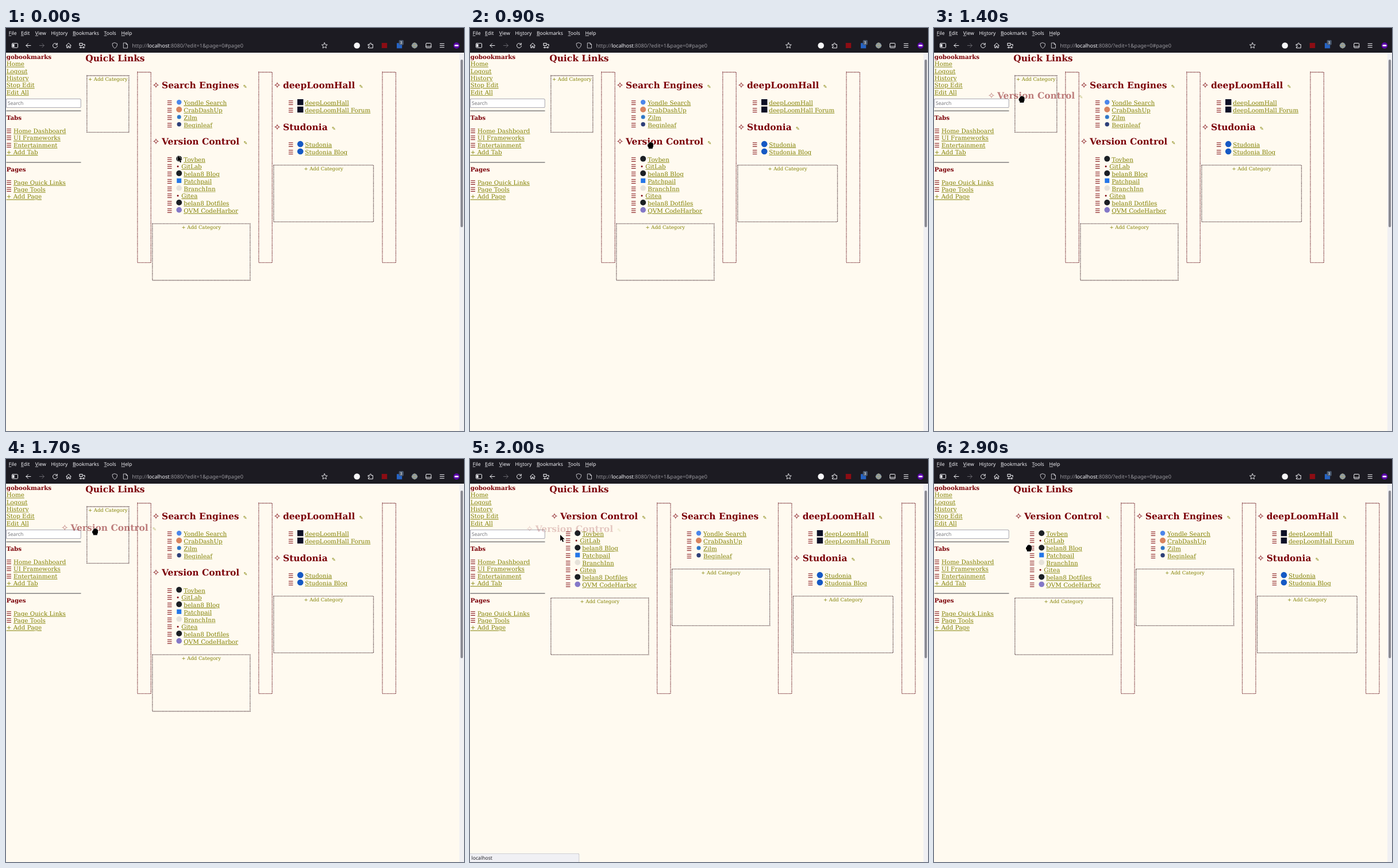
Recreate the animation shown at these times as an HTML page with a canvas. Size 797 by 702 pixels, loop 3 s.

```html
<!DOCTYPE html>
<html lang="en">
<head>
<meta charset="utf-8">
<title>Quick Links</title>
<style>
  html, body { margin: 0; width: 100%; height: 100%; overflow: hidden; background: #fffaf0; }
  canvas { display: block; }
</style>
</head>
<body>
<canvas id="stage" width="797" height="702"></canvas>
<script>
const ctx = document.getElementById('stage').getContext('2d');
ctx.textRendering = 'geometricPrecision';

const LOOP = 3000, STEP = 100;
const PAPER = '#fffaf0', MAROON = '#7b0008', OLIVE = '#808000', BAR = '#1c1b22', LIGHT = '#f4f4f8';
const BODY = '10.35px "DejaVu Serif", serif';
const BOLD = 'bold ' + BODY;
const HEAD = 'bold 15.45px "DejaVu Serif", serif';
const SMALL = '8.45px "DejaVu Serif", serif';
const SYMBOL = '10.35px "DejaVu Sans", sans-serif';
const UI = '8.65px "Noto Sans", sans-serif';
const URL_FONT = '9.1px "Noto Sans", sans-serif';

// Links: [label, icon shape, icon colour, radius]; no shape means a plain bullet.
const SEARCH = { title: 'Search Engines', links: [
  ['Yondle Search', 'dot', '#4b86ea', 4.2], ['CrabDashUp', 'dot', '#d8845f', 5],
  ['Zilm', 'dot', '#2f78c8', 3.5], ['Beginleaf', 'dot', '#2d3f78', 3.7]] };
const VERSION = { title: 'Version Control', links: [
  ['Tovben', 'dot', '#1b1f24', 5], ['GitLab'], ['belan8 Blog', 'dot', '#1b1f24', 5],
  ['Patchpail', 'box', '#2476e8', 4], ['BranchInn', 'dot', '#e6e2da', 4.8], ['Gitea'],
  ['belan8 Dotfiles', 'dot', '#1b1f24', 5], ['QVM CodeHarbor', 'dot', '#8478c8', 4.8]] };
const CAMP = { title: 'deepLoomHall', links: [
  ['deepLoomHall', 'box', '#0d1026', 5.2], ['deepLoomHall Forum', 'box', '#0d1026', 5.2]] };
const COURSES = { title: 'Studonia', links: [
  ['Studonia', 'dot', '#1559c4', 5.3], ['Studonia Blog', 'dot', '#1559c4', 5.3]] };

const BEFORE = { strips: [228.8, 439.8, 655], columns: [
  { x: 140.8, width: 73, groups: [] },
  { x: 254.8, width: 170, groups: [SEARCH, VERSION] },
  { x: 465.8, width: 173.7, groups: [CAMP, COURSES] }] };
const AFTER = { strips: [325.6, 536.5, 751.5], columns: [
  { x: 140.8, width: 170, groups: [VERSION] },
  { x: 351.6, width: 170, groups: [SEARCH] },
  { x: 562.5, width: 173.7, groups: [CAMP, COURSES] }] };

// Pointer path: time, x, y
const PATH = [[0, 299, 222], [900, 314, 204.3], [1400, 152.5, 124], [1900, 156.3, 128],
  [2000, 157, 132], [2500, 162, 143.5], [2900, 165, 155], [3000, 165, 155]];
const GRAB = { x: 313.5, y: 204.5 };

function write(str, x, y, font, color) {
  ctx.font = font;
  ctx.fillStyle = color;
  ctx.fillText(str, x, y);
  return ctx.measureText(str).width;
}

function fill(color, x, y, w, h, r = 0) {
  ctx.fillStyle = color;
  ctx.beginPath();
  ctx.roundRect(x, y, w, h, r);
  ctx.fill();
}

function dot(color, x, y, r) {
  ctx.fillStyle = color;
  ctx.beginPath();
  ctx.arc(x, y, r, 0, Math.PI * 2);
  ctx.fill();
}

function outline(d, x, y, color = LIGHT, width = 1) {
  ctx.save();
  ctx.translate(x, y);
  ctx.strokeStyle = color;
  ctx.lineWidth = width;
  ctx.lineJoin = ctx.lineCap = 'round';
  ctx.stroke(new Path2D(d));
  ctx.restore();
}

// The underline breaks around descenders.
function link(str, x, y) {
  ctx.font = BODY;
  fill(OLIVE, x, y + 1.1, ctx.measureText(str).width, 0.9);
  ctx.strokeStyle = PAPER;
  ctx.lineWidth = 1.5;
  ctx.strokeText(str, x, y);
  write(str, x, y, BODY, OLIVE);
}

function dotted(x, y, w, h, color) {
  ctx.save();
  ctx.strokeStyle = color;
  ctx.lineWidth = 1.3;
  ctx.setLineDash([1.3, 1.3]);
  ctx.strokeRect(x, y, w, h);
  ctx.restore();
}

function heading(title, x, y) {
  write('✧', x - 0.4, y, 'bold 15.45px "DejaVu Sans", sans-serif', MAROON);
  const width = write(title, x + 16.2, y, HEAD, MAROON);
  write('✎', x + width + 23.3, y, '8.4px "DejaVu Sans", sans-serif', OLIVE);
}

function bookmark([label, shape, color, size], x, y) {
  write('☰', x + 25.2, y, SYMBOL, MAROON);
  const cx = x + 46.4, cy = y - 4.8;
  if (shape === 'dot') dot(color, cx, cy, size);
  else if (shape === 'box') fill(color, cx - size, cy - size, size * 2, size * 2);
  else write('•', x + 41.1, y, BODY, MAROON);
  link(label, x + (shape ? 54.5 : 50.5), y);
}

function addBox(x, y, w) {
  dotted(x, y, w, 98.7, '#40262c');
  ctx.textAlign = 'center';
  write('+ Add Category', x + w / 2, y + 9.1, SMALL, OLIVE);
  ctx.textAlign = 'left';
}

function column({ x, width, groups }) {
  let y = 73.9;
  for (const { title, links } of groups) {
    y += 30.9;
    heading(title, x, y);
    y += 16.35;
    for (const item of links) {
      y += item[1] ? 12.85 : 12.4;
      bookmark(item, x, y);
    }
  }
  addBox(x, groups.length ? y + 19.1 : 83, width);
}

function sidebar() {
  write('gobookmarks', 0.7, 54.2, BOLD, MAROON);
  ['Home', 'Logout', 'History', 'Stop Edit', 'Edit All']
    .forEach((label, i) => link(label, 0.7, 66.4 + i * 12.35));

  fill('#8f8f9d', 0, 123.2, 130.6, 15.8, 2);
  fill('#fff', 0.8, 124, 129, 14.2, 1.5);
  write('Search', 3, 134.2, UI, '#77777c');

  section('Tabs', 160.3, ['Home Dashboard', 'UI Frameworks', 'Entertainment'], '+ Add Tab');
  section('Pages', 249.9, ['Page Quick Links', 'Page Tools'], '+ Add Page');
}

function section(title, y, items, action) {
  fill('#68676a', 0.5, y - 16.5, 130, 1.3);
  write(title, 0.7, y, BOLD, MAROON);
  y += 22.8;
  for (const item of items) {
    write('☰', 0.4, y, SYMBOL, MAROON);
    link(item, 13, y);
    y += 12.35;
  }
  link(action, 0.7, y);
}

function menuBar() {
  const menus = [['File', 4.8, 0], ['Edit', 26, 0], ['View', 50.8, 0], ['History', 78.4, 2],
    ['Bookmarks', 116, 0], ['Tools', 170.6, 0], ['Help', 200.6, 0]];
  for (const [label, x, key] of menus) {
    write(label, x, 11.8, UI, LIGHT);
    const left = ctx.measureText(label.slice(0, key)).width;
    fill(LIGHT, x + left, 13, ctx.measureText(label[key]).width, 0.7);
  }
}

function address() {
  let x = 219.2;
  for (const [part, color] of [['http://', '#96959b'], ['localhost', LIGHT],
    [':8080/?edit=1&page=0#page0', '#96959b']]) {
    x += write(part, x, 33.9, URL_FONT, color);
  }
}

function toolbar() {
  const y = 30.5;
  outline('M-4 -3.8h8q1 0 1 1v5.6q0 1 -1 1h-8q-1 0 -1 -1v-5.6q0 -1 1 -1z', 15.5, y);
  fill(LIGHT, 11.5, 28, 3, 5);
  outline('M-4 0H4M-4 0L-0.5 -3.5M-4 0L-0.5 3.5', 39, y);
  outline('M4 0H-4M4 0L0.5 -3.5M4 0L0.5 3.5', 62.3, y, '#66656c');
  outline('M3.2 -2.3A4 4 0 1 0 4 0.6M3.7 -4.2V-1.4H0.9', 85.5, y);
  outline('M-4.3 0L0 -4.2L4.3 0M-3.2 -0.8V4H-1V1H1V4H3.2V-0.8', 109, y);
  outline('M-4.5 -4H0.5V0H-4.5zM-4.5 3.5H4.5M-2.5 1.8V4.5M2.5 1.8V4.5M2 -2H4.5V1', 132.5, y, LIGHT, 1.1);

  outline('M0 -4.8L4.2 -3.2Q4.4 2.5 0 4.8Q-4.4 2.5 -4.2 -3.2Z', 189.3, y, '#d5d4da', 0.9);
  outline('M-3.3 -4.5H1L3.5 -2V4.5H-3.3zM1 -4.5V-2H3.5', 208, y, '#d5d4da', 0.9);
  address();

  let star = '';
  for (let i = 0; i < 10; i++) {
    const a = i * Math.PI / 5 - Math.PI / 2, r = i % 2 ? 2.4 : 5.2;
    star += (i ? 'L' : 'M') + r * Math.cos(a) + ' ' + r * Math.sin(a);
  }
  outline(star + 'Z', 554.3, y + 0.3, LIGHT, 0.9);

  dot('#f6f6f8', 610.7, y, 5.3);
  outline('M-4 -2H-1.3V-3.2A1.2 1.2 0 0 1 1.1 -3.2V-2H3.8V4.3H-4V2.3H-2.8A1.2 1.2 0 0 0 -2.8 0H-4z', 634.5, y);
  fill('#8c0d14', 653.8, 26, 9.4, 9);
  fill('#2563c4', 680, 26.2, 9.2, 9.2);
  fill('#47566b', 683.7, 21, 8.2, 8.4, 1.5);
  write('3', 685.6, 28, '7px "Noto Sans", sans-serif', '#fff');
  dot('#8797a3', 711, y, 5.1);
  outline('M-5 0H5M0 -5Q-4.5 0 0 5Q4.5 0 0 -5', 711, y, '#b9ad79', 0.7);
  outline('M-3.5 -4H3.5Q4.5 -4 4.5 -3V3Q4.5 4 3.5 4H-3.5Q-4.5 4 -4.5 3V-3Q-4.5 -4 -3.5 -4zM-4.5 1.6H4.5', 735.3, y);
  outline('M-3.6 -3.2H3.6M-3.6 0H3.6M-3.6 3.2H3.6', 758.8, y);
  dot('#5a00a8', 784, y, 5.4);
  fill('#efe6fa', 780.4, 28.9, 7.2, 3.2, 1.6);
}

function browser() {
  fill(BAR, 0, 0, 797, 43);
  menuBar();
  toolbar();
  fill('#f0f0f3', 789, 43, 8, 659);
  fill('#8b8b93', 791, 55, 4.2, 292, 2.1);
}

function statusBubble() {
  fill('#c4c4c8', -3, 687, 193.2, 18, 2);
  fill('#f0f0f4', -3, 687.8, 192.4, 18, 2);
  write('localhost', 2.5, 698.2, UI, '#25242a');
}

function pointerAt(t) {
  const i = PATH.findIndex(p => p[0] > t);
  const [t0, x0, y0] = PATH[i - 1], [t1, x1, y1] = PATH[i];
  const k = (t - t0) / (t1 - t0), e = k * k * (3 - 2 * k);
  return { x: x0 + (x1 - x0) * e, y: y0 + (y1 - y0) * e };
}

function pointer(t, { x, y }) {
  const fist = t >= 400 && t < 1900 || t >= 2600;
  const shape = new Path2D(fist
    ? 'M-3.2 6V4.2L-5 1.5Q-5.4 -1.5 -3.4 -2.2Q-3.2 -5.2 -1.2 -4.8Q0.2 -6.6 1.4 -4.9Q3 -5.6 3.6 -3.9Q5.2 -3.8 5 -1.8V2L3.8 4.4V6Z'
    : 'M0 0V10.8L2.4 8.6L4.1 12.5L6.1 11.6L4.4 7.8H7.7Z');
  ctx.save();
  ctx.translate(x, y);
  ctx.strokeStyle = 'rgba(255,255,255,.8)';
  ctx.lineWidth = 1.2;
  ctx.lineJoin = 'round';
  ctx.stroke(shape);
  ctx.fillStyle = '#000';
  ctx.fill(shape);
  ctx.restore();
}

function ghost(t, p) {
  if (t < 1000 || t >= 2200) return;
  const held = t < 1900 ? p : pointerAt(1900);
  ctx.save();
  ctx.globalAlpha = t < 1900 ? 0.5 : t < 2000 ? 0.44 : t < 2100 ? 0.2 : 0.06;
  ctx.translate(held.x - GRAB.x, held.y - GRAB.y);
  heading('Version Control', 254.8, 203.4);
  ctx.restore();
}

function draw(now) {
  const t = Math.floor(now % LOOP / STEP) * STEP;
  const layout = t < 2000 ? BEFORE : AFTER;
  const p = pointerAt(t);
  fill(PAPER, 0, 0, 797, 702);
  sidebar();
  write('Quick Links', 138.2, 57.7, HEAD, MAROON);
  layout.strips.forEach(x => dotted(x, 77, 23.4, 331.7, '#64101a'));
  layout.columns.forEach(column);
  browser();
  if (t >= 2000 && t < 2200) statusBubble();
  ghost(t, p);
  pointer(t, p);
}

const start = performance.now();
function tick() {
  draw(performance.now() - start);
  requestAnimationFrame(tick);
}
tick();
</script>
</body>
</html>
```
